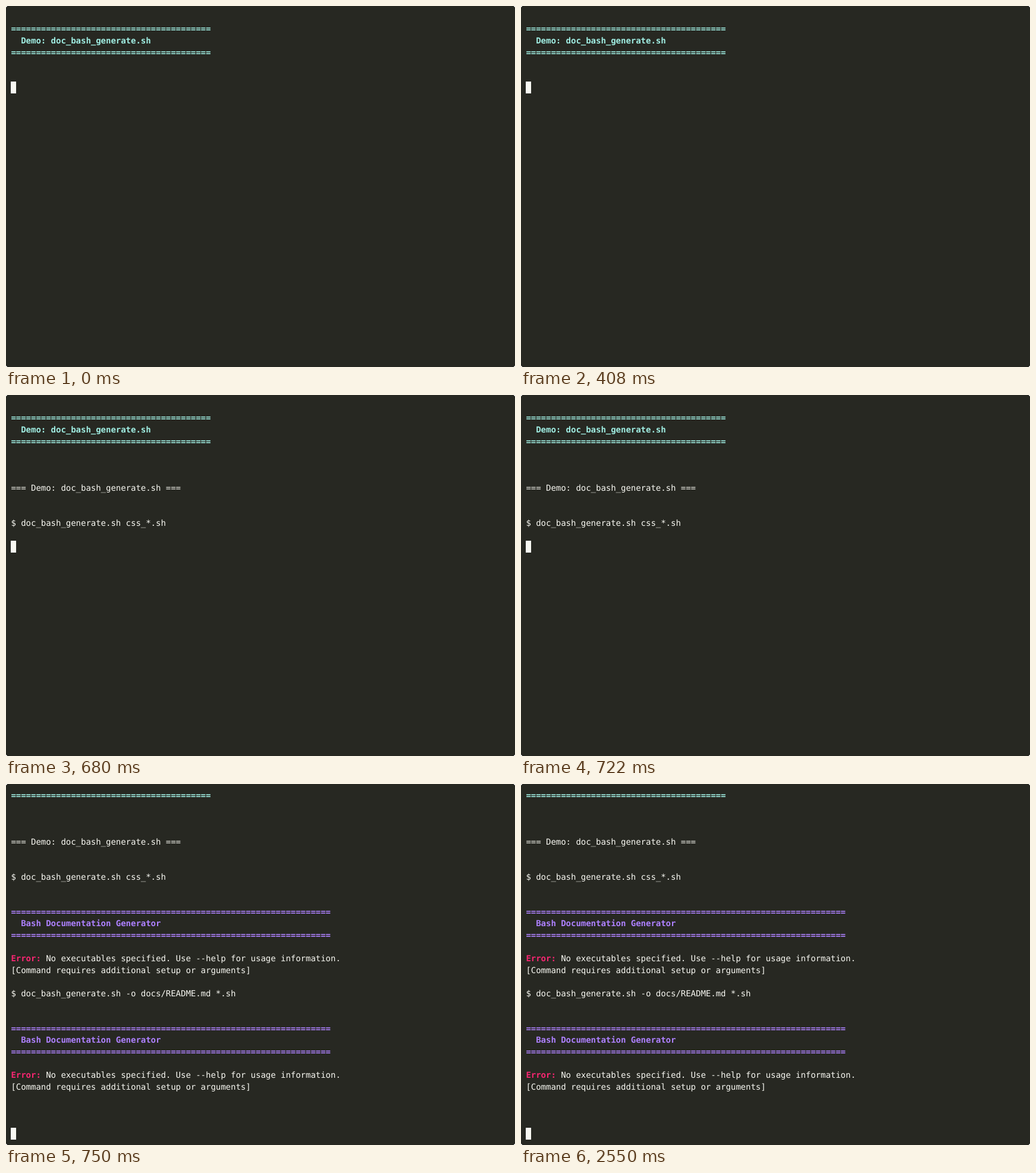
Animation of 856 by 607 pixels, one loop 3750 ms. Source, as an HTML page:

```html
<!DOCTYPE html>
<html lang="en">
<head>
<meta charset="utf-8">
<title>Terminal demo</title>
<style>
  html, body { margin: 0; height: 100%; overflow: hidden; background: #fff; }
  svg { display: block; }
  text {
    font: 14px "DejaVu Sans Mono", monospace;
    letter-spacing: -0.0287px; /* fits the 8.4px cell */
    text-rendering: geometricPrecision;
    white-space: pre;
    fill: #f8f8f2;
  }
  rect { shape-rendering: crispEdges; }
  .cyan, .purple, .red { font-weight: bold; }
  .cyan { fill: #a1efe4; }
  .purple { fill: #ae81ff; }
  .red { fill: #f92672; }
</style>
</head>
<body>
<svg width="856" height="607">
  <rect width="856" height="607" rx="4" fill="#272822"/>
  <g id="screen"></g>
  <rect id="cursor" x="8" width="9" height="20" fill="#f8f8f2"/>
</svg>
<script>
const CELL = 8.4, LINE = 19.6, TOP = 9.8, ROWS = 30, LOOP = 3750;
const screen = document.getElementById('screen');
const cursor = document.getElementById('cursor');

// A line is a list of [text, class] spans.
const plain = text => [[text, '']];
const banner = (title, width, color) =>
  ['='.repeat(width), '  ' + title, '='.repeat(width)].map(text => [[text, color]]);
const failedRun = command => [
  plain('$ ' + command), [], [],
  ...banner('Bash Documentation Generator', 64, 'purple'), [],
  [['Error:', 'red'], [' No executables specified. Use --help for usage information.', '']],
  plain('[Command requires additional setup or arguments]'), []
];
const transcript = [
  [], ...banner('Demo: doc_bash_generate.sh', 40, 'cyan'), [], [], [],
  plain('=== Demo: doc_bash_generate.sh ==='), [], [],
  ...failedRun('doc_bash_generate.sh css_*.sh'),
  ...failedRun('doc_bash_generate.sh -o docs/README.md *.sh'), [], []
];
const steps = [[0, 6], [680, 12], [750, transcript.length]]; // [start ms, lines printed]

function show(count) {
  const scroll = Math.max(0, count + 1 - ROWS);
  screen.innerHTML = transcript.slice(scroll, count).map((line, row) => {
    let column = 0;
    return line.map(([text, color]) => {
      const x = CELL * (1 + column);
      column += text.length;
      return `<text class="${color}" x="${x}" y="${TOP + row * LINE + 14}">${text}</text>`;
    }).join('');
  }).join('');
  cursor.setAttribute('y', Math.floor(TOP + (count - scroll) * LINE + 0.01));
}

let shown;
function draw() {
  const time = performance.now() % LOOP;
  const count = steps.findLast(([start]) => time >= start)[1];
  if (count !== shown) show(shown = count);
  requestAnimationFrame(draw);
}
draw();
</script>
</body>
</html>
```
